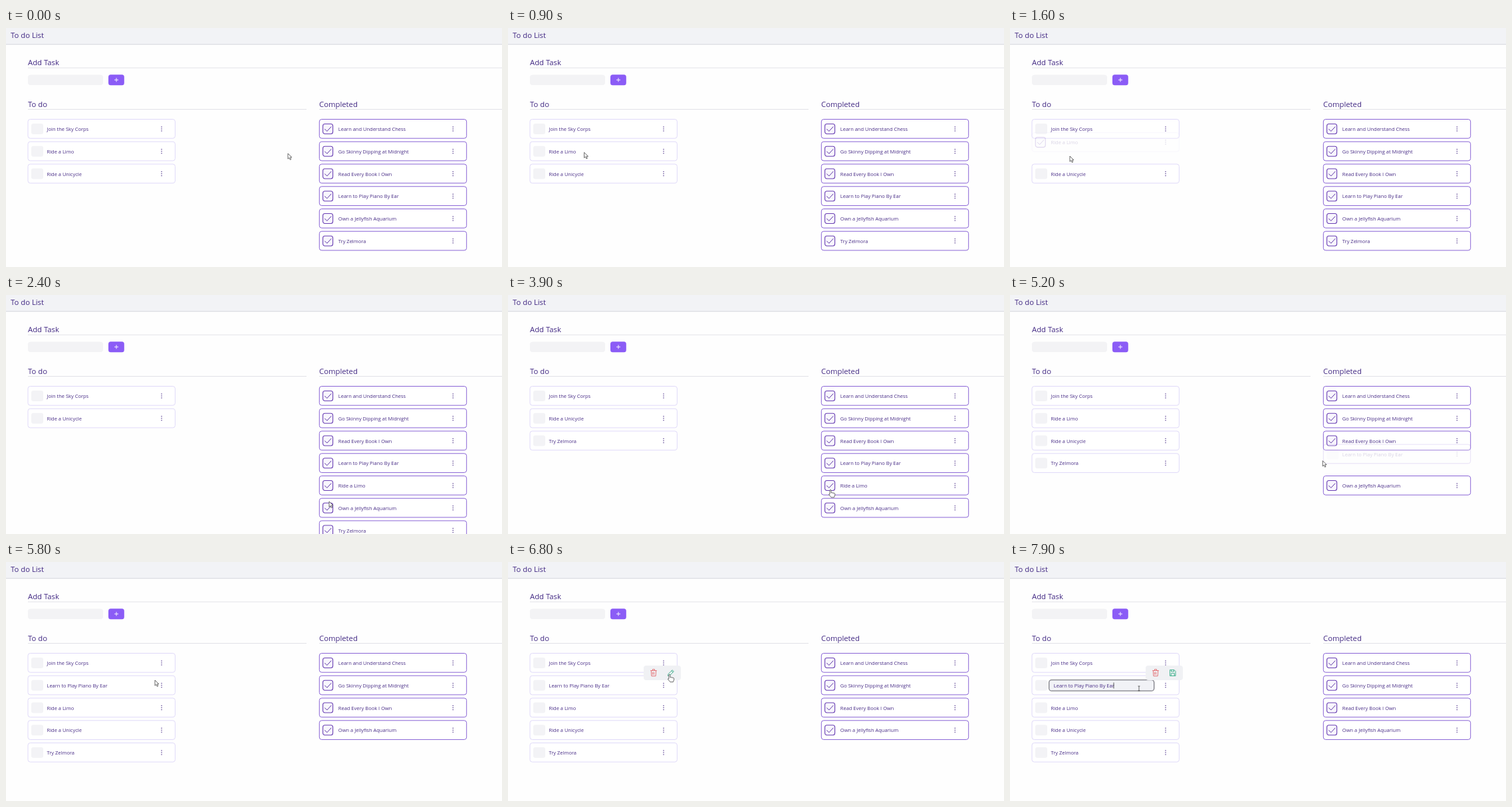
Write an HTML page that moves like this. It is 746 by 360 pixels and loops after 8000 ms.

```html
<!DOCTYPE html>
<html lang="en">
<head>
<meta charset="utf-8">
<title>To do List</title>
<style>
  html, body { margin: 0; width: 746px; height: 360px; overflow: hidden; background: #fefefe; }
  svg { display: block; }
  text { font: 7.5px "Open Sans", "Noto Sans", sans-serif; fill: #4a2f88; }
  .title { font-size: 11.3px; fill: #432a84; }
</style>
</head>
<body>
<svg width="746" height="360" viewBox="0 0 746 360" fill="none">
  <rect width="746" height="24" fill="#f2f3f6"/>
  <path d="M0 24.5H746" stroke="#dcdde2"/>
  <path d="M0 25.5H746" stroke="#f5f5f7"/>
  <path d="M33 60H746M33 122.5H452M471 122.5H746" stroke="#e2e2e7"/>
  <text class="title" x="7" y="15">To do List</text>
  <text class="title" x="33" y="56">Add Task</text>
  <text class="title" x="33" y="119">To do</text>
  <text class="title" x="471" y="119">Completed</text>
  <rect x="33" y="70.5" width="113" height="15.5" rx="4" fill="#f3f3f5"/>
  <rect x="154" y="70.3" width="23.8" height="15.9" rx="3.5" fill="#8b5cf6"/>
  <path d="M163 78.2h6m-3-3v6" stroke="#fff" stroke-width=".9"/>
  <g id="scene"></g>
</svg>
<script>
const LOOP = 8000, PITCH = 33.75, SWAP = 450, LEAVE = 250, ENTER = 100;
const MENU_AT = 6200, EDIT_AT = 7300;
const PIANO = 'Learn to Play Piano By Ear';

// Tasks in list order: text, initially completed, times of the clicks that toggle it.
const tasks = [
  ['Join the Sky Corps', false],
  ['Learn and Understand Chess', true],
  ['Go Skinny Dipping at Midnight', true],
  ['Read Every Book I Own', true],
  [PIANO, true, 5000],
  ['Ride a Limo', false, 1400, 3920],
  ['Ride a Unicycle', false],
  ['Own a Jellyfish Aquarium', true],
  ['Try Zelmora', true, 2900]
].map(([text, done, ...clicks]) => ({ text, done, clicks }));

// Pointer path: time, x, y.
const path = [
  [100, 424, 189], [1200, 46, 187], [1450, 46, 187], [1600, 90, 193],
  [2400, 486, 311], [2750, 485, 352], [3000, 485, 352], [3900, 485, 293],
  [4500, 491, 282], [4800, 485, 254], [5100, 485, 254], [5800, 224, 178],
  [6050, 233, 186], [6400, 233, 186], [6900, 244, 167], [7350, 244, 167],
  [7750, 194, 190]
];

const scene = document.getElementById('scene');
const clamp = v => Math.max(0, Math.min(1, v));

function pointerAt(t) {
  const i = path.findIndex(p => p[0] > t);
  if (i < 0) return path[path.length - 1].slice(1);
  if (i === 0) return path[0].slice(1);
  const [t0, x0, y0] = path[i - 1], [t1, x1, y1] = path[i];
  const p = (t - t0) / (t1 - t0), e = p * p * (3 - 2 * p);
  return [x0 + (x1 - x0) * e, y0 + (y1 - y0) * e];
}

function isDone(task, t) {
  const swaps = task.clicks.filter(click => t >= click + SWAP).length;
  return task.done !== (swaps % 2 === 1);
}

function card(task, row, right, t) {
  const click = task.clicks.filter(c => c <= t).pop() ?? Infinity;
  const swapped = t >= click + SWAP;
  const out = swapped ? 0 : clamp((t - click) / LEAVE);
  const alpha = swapped ? clamp((t - click - SWAP) / ENTER) : 1 - out;
  const checked = right !== (out > 0);
  const editing = task.text === PIANO && t >= EDIT_AT;
  const x = right ? 471.3 : 33, y = 137.5 + row * PITCH - 17 * out;
  const box = checked
    ? '<rect x="5.3" y="7" width="15" height="15" rx="3" fill="#f8f6fd" stroke="#6a40b4" stroke-width="1.1"/>' +
      '<path d="M8 14.5l3.5 3.5 6.5-7" stroke="#5f38a6"/>'
    : '<rect x="5" y="6.5" width="18" height="16" rx="3" fill="#f3f3f6"/>';
  const label = editing
    ? '<rect x="25.7" y="6.3" width="158" height="16.6" rx="4" fill="#f1f2f6" stroke="#7f7f87" stroke-width="1.3"/>' +
      `<text x="32.8" y="17.3">${task.text}</text><path d="M123 10.3v9" stroke="#333" stroke-width=".8"/>`
    : `<text x="28.5" y="17.5">${task.text}</text>`;
  const dots = [11.5, 14.5, 17.5].map(cy => `<circle cx="201" cy="${cy}" r=".75" fill="#4a2f88"/>`).join('');
  return `<g transform="translate(${x} ${y})" opacity="${alpha}">
    <rect width="221.4" height="28.7" rx="3.5" fill="#fff" stroke="${right ? '#8a65d6' : '#e0daf9'}"/>
    ${box}${label}${dots}</g>`;
}

function menu(t) {
  const action = t >= EDIT_AT
    ? '<path d="M240.5 162.5h6.5l2 2v7h-8.5zM242.5 162.5v2.6h4v-2.6M242.3 171.5v-3.7h5v3.7"/>'
    : '<path d="M240.5 171.5l.6-2.8 6-6 2.2 2.2-6 6zM245.8 164l2.2 2.2"/>';
  return `<g stroke-width=".9"><rect x="204" y="156" width="56" height="22" rx="4" fill="#f0f1f4"/>
    <path d="M214.3 163.5h9.4m-6.2 0v-1.8h3v1.8m-5.2 0l.6 8.3h6.2l.6-8.3m-5.2 2.2v4m2-4v4" stroke="#e4686c"/>
    <g stroke="#35ad86">${action}</g></g>`;
}

function pointer(t) {
  const [x, y] = pointerAt(t);
  const onBox = (x > 38 && x < 56 || x > 476 && x < 493) && y > 143 && (y - 143) % PITCH < 18;
  const onDots = x > 230 && x < 238 && y > 180 && y < 191;
  const onMenu = t >= MENU_AT && x > 204 && x < 260 && y > 156 && y < 178;
  let shape;
  if (onBox || onDots || onMenu) {
    shape = '<path d="M-1 1q1-1.4 2 0v4l1-.5 1 .8 1-.5 1 .8 1-.2 .7 1v2.4l-1.2 3h-4.5l-3.4-4.3q.2-1.3 1.4-.4z" fill="#fff" stroke="#444" stroke-width=".8"/>';
  } else if (t >= EDIT_AT && x < 217 && y > 178) {
    shape = '<path d="M-1.5-3h3M0-3v7M-1.5 4h3" stroke="#444" stroke-width=".8"/>';
  } else {
    shape = '<path d="M0 0v8.2l1.9-1.7 1.4 3 1.4-.6-1.3-3h2.5z" fill="#fff" stroke="#444" stroke-width=".8"/>';
  }
  return `<g transform="translate(${x} ${y})">${shape}</g>`;
}

function draw(now) {
  const t = now % LOOP;
  const column = right => tasks
    .filter(task => isDone(task, t) === right)
    .map((task, row) => card(task, row, right, t))
    .join('');
  scene.innerHTML = column(false) + column(true) + (t >= MENU_AT ? menu(t) : '') + pointer(t);
  requestAnimationFrame(draw);
}
requestAnimationFrame(draw);
</script>
</body>
</html>
```
